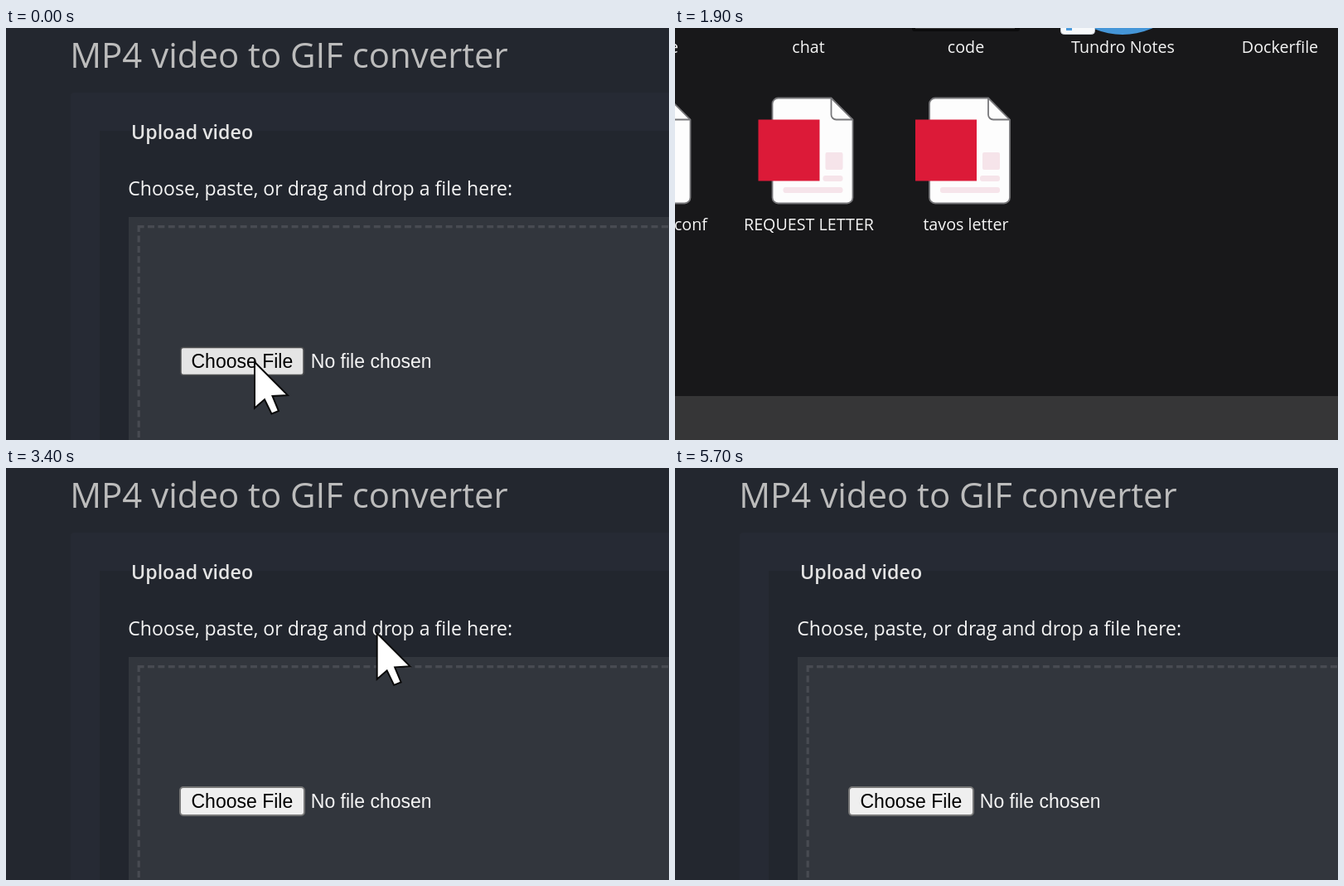
Write an HTML page with a canvas that moves like this. It is 800 px wide and 497 px high and loops after 5.8 s.

```html
<!DOCTYPE html>
<html lang="en">
<head>
<meta charset="utf-8">
<title>Choosing a file</title>
<style>
  html, body { margin: 0; width: 100%; height: 100%; overflow: hidden; background: #23272f; }
  canvas { display: block; }
</style>
</head>
<body>
<canvas id="stage" width="800" height="497"></canvas>
<script>
const ctx = document.getElementById('stage').getContext('2d');
const LOOP = 5800, STEP = 100;
const SANS = '"Open Sans", "Noto Sans", sans-serif';
const ARIAL = '"Liberation Sans", Arial, sans-serif';

// time, x, y of the pointer tip
const PATH = [
  [2100, 420, -60], [2400, 330, 26], [2700, 185, 120], [3000, 245, 250],
  [3300, 410, 240], [3600, 523, 118], [4000, 493, 203], [4200, 300, 322]
];

function box(x, y, w, h, color) {
  ctx.fillStyle = color;
  ctx.fillRect(x, y, w, h);
}

function roundBox(x, y, w, h, r, fill, stroke, line = 1) {
  ctx.beginPath();
  ctx.roundRect(x, y, w, h, r);
  ctx.fillStyle = fill;
  ctx.fill();
  if (stroke) {
    ctx.strokeStyle = stroke;
    ctx.lineWidth = line;
    ctx.stroke();
  }
}

function text(str, x, y, font, color, align = 'left') {
  ctx.font = font;
  ctx.fillStyle = color;
  ctx.textAlign = align;
  ctx.fillText(str, x, y);
}

function drawPage(hover) {
  box(0, 0, 800, 497, '#23272f');
  roundBox(78, 78, 740, 440, 4, '#262a34');
  box(113, 124, 687, 373, '#22262e');
  box(148, 228, 652, 269, '#32363d');

  // both dashed edges start at the corner
  ctx.strokeStyle = '#484b52';
  ctx.lineWidth = 3.2;
  ctx.setLineDash([8, 4.4]);
  ctx.beginPath();
  ctx.moveTo(158.6, 239.7);
  ctx.lineTo(800, 239.7);
  ctx.moveTo(160.2, 238.1);
  ctx.lineTo(160.2, 497);
  ctx.stroke();
  ctx.setLineDash([]);

  text('MP4 video to GIF converter', 77.3, 48, '41.9px ' + SANS, '#bcbcbc');
  text('Upload video', 151, 134, '600 23.2px ' + SANS, '#e4e4e4');
  text('Choose, paste, or drag and drop a file here:', 147.3, 202, '23.1px ' + SANS, '#f4f4f4');
  if (hover) roundBox(211, 385.5, 148, 33, 3, '#e5e5e5', '#4f5052', 1.5);
  else roundBox(210, 385, 150, 34, 4, '#efefef', '#767676', 2);
  text('Choose File', 223.5, 410, '23px ' + ARIAL, '#000');
  text('No file chosen', 367.8, 410, '23px ' + ARIAL, '#f6f6f6');
}

// A window fading in before its content is ready
function drawOpening(alpha) {
  const dark = '#383838', light = '#fbfbfb';
  ctx.globalAlpha = alpha;
  box(460, 0, 340, 350, dark);
  box(115, 350, 685, 119, dark);
  box(0, 371, 115, 98, dark);
  box(0, 289, 86, 25, dark);
  box(0, 287, 115, 1, dark);
  box(0, 315, 115, 1, dark);
  box(0, 0, 460, 287, light);
  box(115, 287, 345, 63, light);
  box(0, 288, 115, 1, light);
  box(86, 289, 29, 25, light);
  box(0, 314, 115, 1, light);
  box(0, 316, 115, 55, light);
  box(0, 469, 800, 28, light);
  ctx.globalAlpha = 1;
}

function sheet(x) {
  ctx.fillStyle = '#fdfdfd';
  ctx.strokeStyle = '#77777a';
  ctx.lineWidth = 1.8;
  ctx.beginPath();
  ctx.moveTo(x + 71, 84.5);
  ctx.lineTo(x + 97, 110.5);
  ctx.arcTo(x + 97, 211.5, x, 211.5, 7);
  ctx.arcTo(x, 211.5, x, 84.5, 7);
  ctx.arcTo(x, 84.5, x + 71, 84.5, 7);
  ctx.closePath();
  ctx.fill();
  ctx.stroke();
  ctx.beginPath();
  ctx.moveTo(x + 71, 84.5);
  ctx.arcTo(x + 71, 110.5, x + 97, 110.5, 6);
  ctx.lineTo(x + 97, 110.5);
  ctx.stroke();
}

function documentIcon(x) {
  sheet(x);
  const pink = '#f6e4ea';
  roundBox(x + 64, 150, 21, 21, 2, pink);
  roundBox(x + 61, 178, 24, 7, 3, pink);
  roundBox(x + 13, 192, 72, 7, 3, pink);
  box(x - 17, 110.5, 74, 74, '#dc1a38');
}

function drawFiles(badge) {
  box(0, 0, 800, 497, '#18181a');
  box(0, 444, 800, 53, '#363637');

  roundBox(286, -20, 130, 24, 3, '#0c0c0d');
  box(290, 0, 120, 1, '#3a3a3c');
  ctx.fillStyle = '#4596d8';
  ctx.beginPath();
  ctx.arc(540, -80, 88, 0, 7);
  ctx.fill();
  if (badge) {
    roundBox(465.5, -30, 41, 37.5, 4, '#f7f9fb', '#c5cbd2');
    box(472, 0, 7, 3, '#4c9bdc');
  }

  sheet(-78.5);
  documentIcon(117.5);
  documentIcon(307);

  const label = (str, x, y, align = 'center') =>
    text(str, x, y, '19.7px ' + SANS, '#f6f6f6', align);
  label('e', 4, 30, 'right');
  label('chat', 161, 30);
  label('code', 351, 30);
  label('Tundro Notes', 540.5, 30);
  label('Dockerfile', 730, 30);
  label('conf', 39, 244, 'right');
  label('REQUEST LETTER', 161.5, 244);
  label('tavos letter', 351, 244);
}

function drawPointer(x, y) {
  ctx.beginPath();
  [[0, 0], [0, 55.5], [12, 45], [20.5, 62.5], [29, 59], [21.5, 41], [40, 40]]
    .forEach(([dx, dy]) => ctx.lineTo(x + dx, y + dy));
  ctx.closePath();
  ctx.fillStyle = '#fff';
  ctx.strokeStyle = '#0a0a0a';
  ctx.lineWidth = 2;
  ctx.fill();
  ctx.stroke();
}

function pointerAt(t) {
  if (t < 1100) return [300, 403];
  const i = PATH.findIndex(([time]) => time >= t);
  if (i < 1) return null;
  const [t0, x0, y0] = PATH[i - 1], [t1, x1, y1] = PATH[i];
  const k = (t - t0) / (t1 - t0);
  return [x0 + (x1 - x0) * k, y0 + (y1 - y0) * k];
}

function draw(now) {
  const t = Math.floor(now % LOOP / STEP) * STEP;
  if (t >= 600 && t < 2100) {
    drawFiles(t >= 1400);
  } else {
    drawPage(t < 600);
    if (t >= 400 && t < 600) drawOpening(t < 500 ? 0.25 : 0.62);
  }
  const tip = pointerAt(t);
  if (tip) drawPointer(...tip);
}

const start = performance.now();
function tick() {
  draw(performance.now() - start);
  requestAnimationFrame(tick);
}
tick();
</script>
</body>
</html>
```
